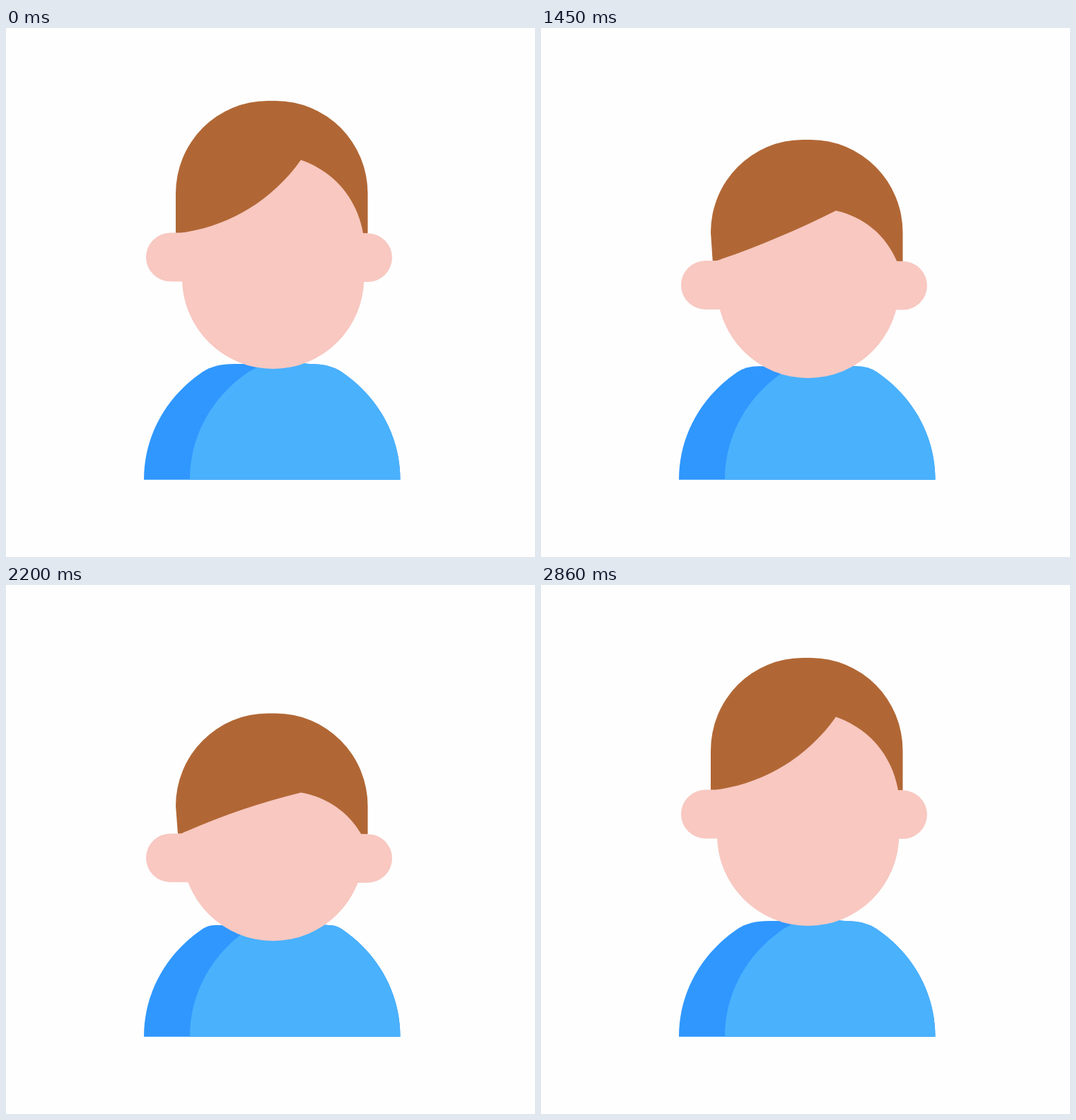
These frames come from a looping animation (748x748 px, 3100 ms). An HTML page:

```html
<!DOCTYPE html>
<html lang="en">
<head>
<meta charset="utf-8">
<title>Nodding figure</title>
<style>
  html, body { margin: 0; width: 100%; height: 100%; overflow: hidden; background: #fefefe; }
  svg { display: block; width: 100vw; height: 100vh; }
</style>
</head>
<body>
<svg viewBox="0 0 748 748">
  <path id="body" fill="#2f97fe"/>
  <path id="front" fill="#4ab1fd"/>
  <path id="hair" fill="#b16735"/>
  <g fill="#f8c8c1">
    <rect id="earL" x="198" width="170" height="68.8" rx="34.4"/>
    <rect id="earR" x="376" width="170" height="68.8" rx="34.4"/>
    <path id="face"/>
  </g>
</svg>
<script>
const LOOP = 3100, STEP = 30, START = 1030;
const $ = id => document.getElementById(id);
const mix = (a, b, k) => a.map((v, i) => v + (b[i] - v) * k);

// hair top, ear top, parting, face centre, collar y, collar x,
// left fringe bulge, right fringe bulge, left hair corner, right hair corner
const rest = [103, 289.6, 186.5, 353.3, 475, 322, 20.6, -19, 240, 505];
const up = [94.5, 262.5, 157.5, 340.7, 469, 340, 22.5, -20, 243, 506];
const down = [188, 358, 303.5, 377, 482, 293, -6, -11, 243, 502];

const keys = [
  [960, rest],
  [1214, mix(rest, up, 0.72)],
  [1600, down],
  [1945, mix(up, down, 0.604)],
  [2296, down],
  [2676, up],
  [2860, rest]
];

function poseAt(t) {
  const i = keys.findIndex(k => t < k[0]);
  if (t < START || i < 1) return rest;
  const [t0, a] = keys[i - 1], [t1, b] = keys[i];
  return mix(a, b, (1 - Math.cos(Math.PI * (t - t0) / (t1 - t0))) / 2);
}

// Shallow arc between two points, bulging sideways by the given height
function arc(x0, y0, x1, y1, bulge) {
  const dx = x1 - x0, dy = y1 - y0, h = bulge * 4 / 3 / Math.hypot(dx, dy);
  const at = f => `${x0 + dx * f - dy * h} ${y0 + dy * f + dx * h}`;
  return `C${at(0.32)} ${at(0.68)} ${x1} ${y1}`;
}

function draw(t) {
  const [top, ear, part, mid, cy, cx, bulgeL, bulgeR, left, right] = poseAt(t);
  const earR = ear + 0.7, side = top + 131, bend = 278 + (486.3 - cy) * 1.5;
  const mirror = x => 752.5 - x;
  const shoulder = x => `M${x} 638.7C${x} 575 ${x + 33} 520 ${x + 83} 486.3`;
  const rightSide = `L${mirror(cx)} ${cy}Q${mirror(bend)} ${cy} ${mirror(278)} 486.3` +
    `C${mirror(228)} 520 557.5 575 557.5 638.7Z`;

  $("body").setAttribute("d", `${shoulder(195)}Q${bend} ${cy} ${cx} ${cy}${rightSide}`);
  $("front").setAttribute("d", `${shoulder(260)}L376 468${rightSide}`);
  $("hair").setAttribute("d", `M${left} ${ear + 0.3}L240 ${side}A130 131 0 0 1 370 ${top}` +
    `H381.5A130 131 0 0 1 511.5 ${side}V${earR + 0.3}Z`);
  $("earL").setAttribute("y", ear);
  $("earR").setAttribute("y", earR);
  $("face").setAttribute("d", `M248 ${ear}${arc(248, ear, 417, part, bulgeL)}` +
    `${arc(417, part, right, earR, bulgeR)}L506.3 ${mid}A128.7 128.7 0 0 1 248.9 ${mid}Z`);
}

const begin = performance.now();
function tick() {
  const t = (performance.now() - begin) % LOOP;
  draw(Math.floor((t - 10) / STEP) * STEP + 10);
  requestAnimationFrame(tick);
}
tick();
</script>
</body>
</html>
```
